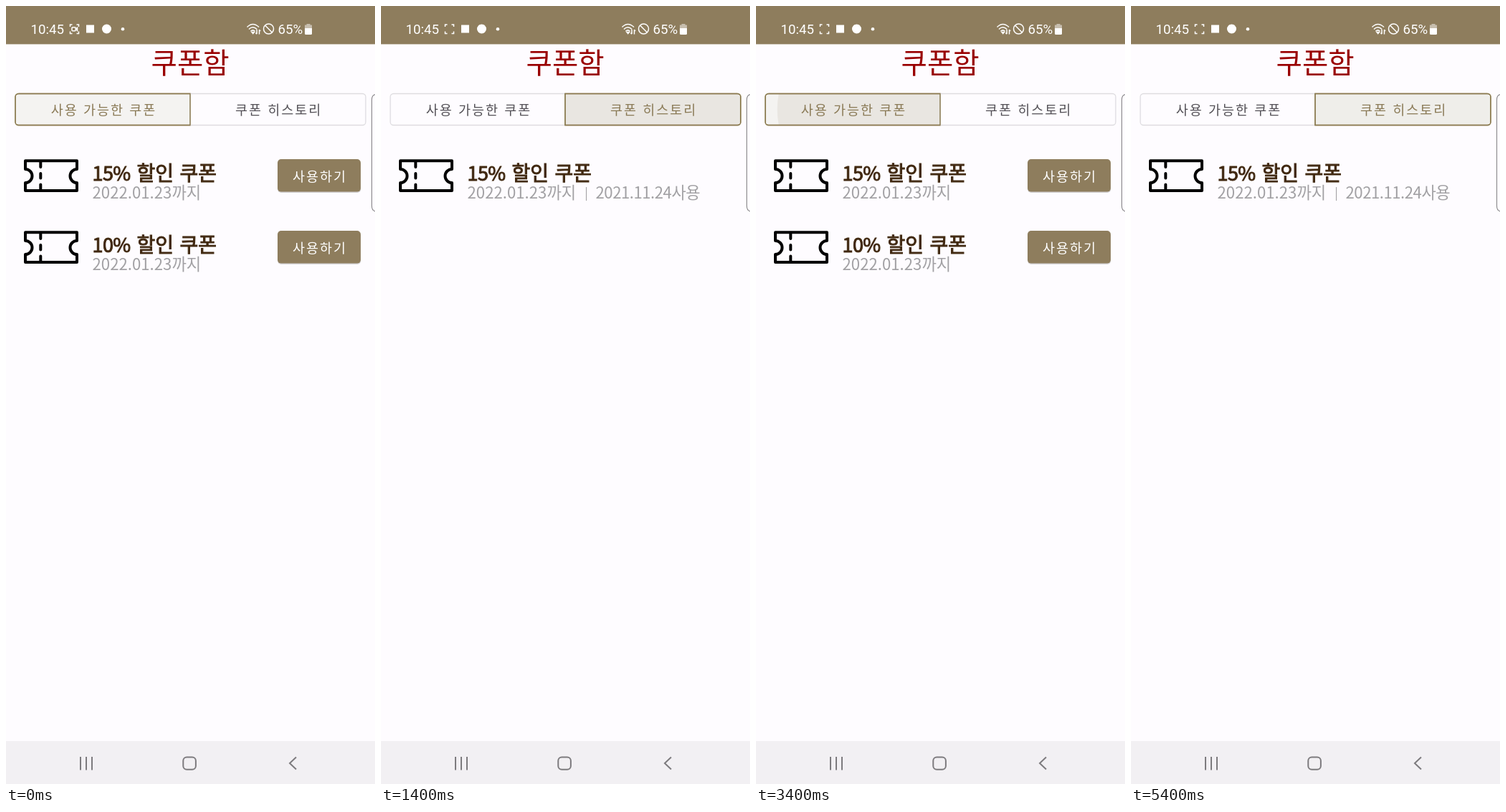
Recreate the animation shown at these times as an HTML page. Size 515x1087 px, loop 6.6 s.

```html
<!DOCTYPE html>
<html lang="ko">
<head>
<meta charset="utf-8">
<title>쿠폰함</title>
<style>
  html, body { margin: 0; width: 100%; height: 100%; overflow: hidden; background: #fefcff; }
  svg { display: block; width: 515px; height: 1087px; }
  text { font-family: "Noto Sans CJK KR", "Noto Sans CJK", sans-serif; }
  .status { font: 18.7px Roboto, sans-serif; fill: #fff; }
  .title { font-size: 39.6px; fill: #990000; }
  .label { font-size: 18.5px; letter-spacing: 2px; }
  .name, .rate { font-size: 28px; fill: #402810; stroke: #402810; stroke-width: 1; }
  .rate { font-size: 27px; letter-spacing: -.6px; }
  .date { font-size: 22.2px; fill: #a2a1a4; }
  .bar { font-size: 17px; fill: #a2a1a4; }
  .line { fill: none; stroke: #fff; stroke-width: 1.5; }
  .nav { fill: none; stroke: #7d7b7e; stroke-width: 2; }
  .ticket { fill: none; stroke: #000; stroke-width: 4; stroke-linejoin: round; }
</style>
</head>
<body>
<svg viewBox="0 0 515 1087">
  <defs>
    <path id="leftTab" d="M257 122.500H17.500a4.500 4.500 0 0 0-4.500 4.500V162a4.500 4.500 0 0 0 4.500 4.500H257Z"/>
    <path id="rightTab" d="M257 122.500H497.500a4.500 4.500 0 0 1 4.500 4.500V162a4.500 4.500 0 0 1-4.500 4.500H257Z"/>
    <clipPath id="leftClip"><use href="#leftTab"/></clipPath>
    <clipPath id="rightClip"><use href="#rightTab"/></clipPath>
    <g id="ticket" class="ticket">
      <path d="M27 216.300H99V228A9.500 9.500 0 0 0 99 247V258H27V247A9.500 9.500 0 0 0 27 228Z"/>
      <path d="M48.300 217V225M48.300 234V240.500M48.300 249.500V257" stroke-linecap="round"/>
    </g>
    <g id="useButton">
      <rect x="379" y="215.300" width="116.300" height="45.700" rx="5" fill="#000" opacity=".16"/>
      <rect x="379" y="214" width="116" height="45.600" rx="5" fill="#8e7d5d"/>
      <text class="label" x="400" y="245" fill="#fff">사용하기</text>
    </g>
  </defs>

  <rect width="515" height="1087" fill="#fefcff"/>
  <rect width="515" height="53.400" fill="#8e7d5d"/>

  <!-- status bar -->
  <text class="status" x="34.500" y="39">10:45</text>
  <path class="line" d="M89.500 29V26H92.500M98.500 26H101.500V29M101.500 35.500V38.500H98.500M92.500 38.500H89.500V35.500"/>
  <g id="camera" class="line">
    <rect x="92" y="29.700" width="5.200" height="5" rx="1"/>
    <path d="M97.500 32L99.500 30.300V34.200Z" fill="#fff"/>
  </g>
  <rect x="112" y="26.500" width="11" height="11" fill="#fff"/>
  <circle cx="140.500" cy="32" r="6.500" fill="#fff"/>
  <circle cx="163" cy="32.300" r="2.300" fill="#fff"/>
  <g class="line">
    <path d="M336.500 29.500Q344.500 21.500 353 29.500M339 32.500Q344.500 27 350.300 32.500M341.500 35.300Q344.500 32.500 347.500 35.300"/>
    <path d="M343 36.500L344.700 38.500L346.500 36.500Z" fill="#fff"/>
    <path d="M350 33V39M348.500 37.500L350 39.200M353.500 39.500V33M355 35L353.500 33.200"/>
    <circle cx="366.500" cy="32" r="7"/>
    <path d="M361.500 27L371.500 37"/>
  </g>
  <text class="status" x="379.500" y="39">65%</text>
  <path d="M419.500 25H424.500V26.500H427V31H417V26.500H419.500Z" fill="#fff" opacity=".5"/>
  <path d="M417 31H427V38.500Q427 40 425.500 40H418.500Q417 40 417 38.500Z" fill="#fff"/>

  <text class="title" x="202.500" y="94">쿠폰함</text>

  <!-- tabs: fill, ripple and outline are set by the script -->
  <use id="leftFill" href="#leftTab"/>
  <use id="rightFill" href="#rightTab"/>
  <circle id="ripple" cy="144.500"/>
  <g fill="none" stroke-width="1.300">
    <use id="leftLine" href="#leftTab"/>
    <use id="rightLine" href="#rightTab"/>
    <use id="topLine" stroke="#8a7a4f"/>
  </g>
  <text id="leftText" class="label" x="62.700" y="152">사용 가능한 쿠폰</text>
  <text id="rightText" class="label" x="320" y="152">쿠폰 히스토리</text>

  <!-- first coupon, shared by both lists -->
  <use href="#ticket"/>
  <text class="rate" x="120.500" y="243.500">15%</text>
  <text class="name" x="182.500" y="243.500">할인</text>
  <text class="name" x="242.500" y="243.500">쿠폰</text>
  <text class="date" x="120.500" y="269">2022.01.23까지</text>

  <g id="available">
    <use href="#useButton"/>
    <use href="#ticket" y="100"/>
    <text class="rate" x="120.500" y="343.500">10%</text>
    <text class="name" x="182.500" y="343.500">할인</text>
    <text class="name" x="242.500" y="343.500">쿠폰</text>
    <text class="date" x="120.500" y="369">2022.01.23까지</text>
    <use href="#useButton" y="100"/>
  </g>
  <g id="history">
    <text class="bar" x="284.300" y="266.500">|</text>
    <text class="date" x="299.500" y="269" letter-spacing="-.5">2021.11.24사용</text>
  </g>

  <path d="M516 123.500Q510.500 124.500 510.500 131V279.500Q510.500 286 516 287" fill="#fefcff" stroke="#8f8d90" stroke-width="1.200"/>

  <!-- navigation bar -->
  <rect y="1027" width="515" height="60" fill="#f2f0f3"/>
  <g class="nav">
    <path d="M104 1049V1067.500M112 1049V1067.500M120 1049V1067.500"/>
    <rect x="247.300" y="1049.400" width="17.600" height="17.400" rx="5"/>
    <path d="M405 1049.500L396 1058L405 1066.500"/>
  </g>
</svg>
<script>
const LOOP = 6600, STEP = 100;
const START_RADIUS = 73.5, END_RADIUS = 125;
const GROWTH = [0, 0.81, 1, 1];
const ALPHA = [0.2, 1, 1, 0.45];
const LINE = { on: "#8a7a4f", off: "#dedce0" };
const TEXT = { on: "#8a7a56", off: "#535056" };
const FILL = { on: "#f4f3f1", off: "#fefcff" };

const taps = [
  { at: 1200, side: "right", x: 382 },
  { at: 3300, side: "left", x: 187 },
  { at: 5100, side: "right", x: 355 }
];
const centre = { left: 135, right: 379.5 };
const el = id => document.getElementById(id);
const set = (id, attrs) => {
  for (const key in attrs) el(id).setAttribute(key, attrs[key]);
};
const show = (id, on) => set(id, { visibility: on ? "visible" : "hidden" });

function drawRipple(tap, t) {
  // the last tap freezes half faded until the loop restarts
  const age = tap ? Math.round((t - tap.at) / STEP) : -1;
  const i = tap === taps[2] ? Math.min(age, 3) : age;
  const active = i >= 0 && i < GROWTH.length;
  show("ripple", active);
  if (!active) return;
  const p = GROWTH[i];
  set("ripple", {
    cx: tap.x + (centre[tap.side] - tap.x) * p,
    r: START_RADIUS + (END_RADIUS - START_RADIUS) * p,
    fill: i ? "#e9e6e1" : "#eaeae6",
    "fill-opacity": ALPHA[i],
    "clip-path": `url(#${tap.side}Clip)`
  });
}

function draw(t) {
  let selected = "left", latest = null;
  for (const tap of taps) {
    if (t >= tap.at) latest = tap;
    if (t >= tap.at + STEP) selected = tap.side;
  }
  for (const side of ["left", "right"]) {
    const state = side === selected ? "on" : "off";
    set(side + "Fill", { fill: FILL[state] });
    set(side + "Line", { stroke: LINE[state] });
    set(side + "Text", { fill: TEXT[state] });
  }
  set("topLine", { href: `#${selected}Tab` });
  show("available", selected === "left");
  show("history", selected === "right");
  show("camera", t < 5300 && Math.floor((t + 200) / 500) % 2 === 0);
  drawRipple(latest, t);
}

const begin = performance.now();
function tick() {
  const t = (performance.now() - begin) % LOOP;
  draw(Math.floor(t / STEP) * STEP);
  requestAnimationFrame(tick);
}
tick();
</script>
</body>
</html>
```
